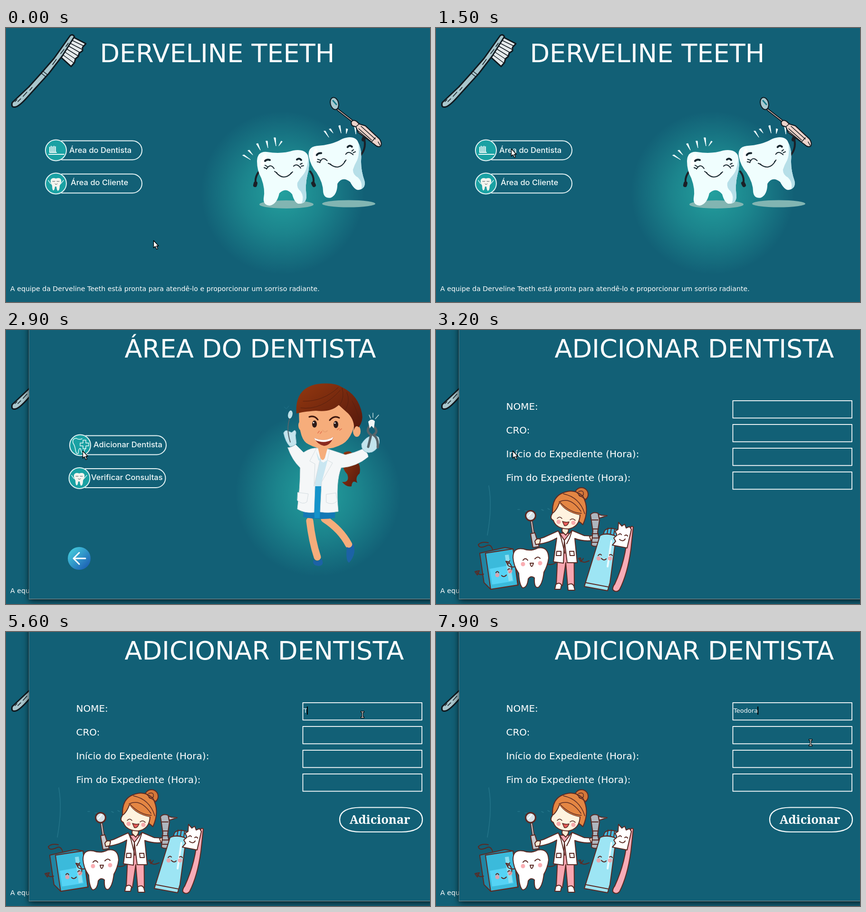
An HTML page for the animation above (8000 ms loop, 892x577 px).

```html
<!DOCTYPE html>
<html lang="pt">
<head>
<meta charset="utf-8">
<title>Clínica</title>
<style>
html, body { margin: 0; width: 100%; height: 100%; overflow: hidden; background: #126076; }
svg { display: block; width: 892px; height: 577px; stroke-linecap: round; stroke-linejoin: round; }
text { font-family: "DejaVu Sans", sans-serif; fill: #fff; stroke: none; }
.title { font-size: 54px; }
.label { font-size: 20px; }
.caption { font: 500 16.5px Inter, sans-serif; fill: #f1fafa; }
.line { fill: none; }
.ink { stroke: #10191f; stroke-width: 3; }
.brown { stroke: #5a2a24; stroke-width: 2; }
.skin { fill: #f6ad7b; }
</style>
</head>
<body>
<svg viewBox="0 0 892 577">
<defs>
  <radialGradient id="glow">
    <stop offset="0" stop-color="#23a09e"/>
    <stop offset=".5" stop-color="#23a09e" stop-opacity=".56"/>
    <stop offset="1" stop-color="#23a09e" stop-opacity="0"/>
  </radialGradient>
  <linearGradient id="blue" x2="1" y2="1">
    <stop offset=".1" stop-color="#45cbdc"/><stop offset=".9" stop-color="#1c5fb4"/>
  </linearGradient>
  <linearGradient id="hair" x2="1" y2="1">
    <stop offset="0" stop-color="#94380f"/><stop offset="1" stop-color="#55180d"/>
  </linearGradient>
  <g id="pill" stroke="#e3f2f3" stroke-width="2">
    <path class="line" d="M12-20H161a20 20 0 0 1 0 40H12"/>
    <circle r="22" fill="#1aa1a3"/>
  </g>
  <g id="molar" stroke="none">
    <path fill="#f4f4ee" d="M-11-8Q-8-14 0-11Q9-14 11-8Q12-2 8 4Q8 14 4 15Q2 14 1 6H-2Q-3 15-6 14Q-8 11-8 4Q-12-2-11-8Z"/>
    <path class="line" stroke="#d5eeee" stroke-width="1.5" d="M-11 0L-16-7M10 0L16-7"/>
    <path class="line" stroke="#42565c" d="M-7-5H-2M2-5H7M-2 0Q0 3 3 0"/>
  </g>
  <g id="tooth">
    <path fill="#f0fefe" d="M528 280Q529 259 549 261Q580 266 604 258Q628 254 635 268Q641 287 634 310Q629 330 632 354Q632 371 615 370Q607 368 602 350Q589 334 575 348Q570 371 555 374Q541 373 542 359Q546 340 537 316Q528 300 528 280Z"/>
    <path fill="#b6dfe8" d="M636 273Q640 289 634 310Q629 330 632 354Q632 366 622 369Q628 356 620 344Q611 337 613 326Q618 317 626 308Q634 297 636 273Z"/>
    <ellipse cx="542" cy="279" rx="5" ry="14" fill="#fff" transform="rotate(18 542 279)"/>
    <g class="line" stroke="#17252d" stroke-width="2">
      <path d="M548 297Q556 284 564 296M545 289l5 3M543 294l5 2M605 291Q612 284 620 295M619 287l4-2M621 291l5-1M568 304Q584 323 601 305M565 302l5 3M599 306l4-3"/>
      <path stroke-width="4" d="M545 280Q549 276 555 278M612 277Q617 273 621 278"/>
    </g>
  </g>
</defs>

<g id="home">
  <circle cx="582" cy="347" r="172" fill="url(#glow)"/>
  <text class="title" x="197.500" y="72">DERVELINE TEETH</text>
  <text x="9" y="554" font-size="14.2">A equipe da Derveline Teeth está pronta para atendê-lo e proporcionar um sorriso radiante.</text>

  <g class="ink">
    <path fill="#e5eaeb" d="M139 18L168 33L161 41L161 48L154 53L152 60L146 65L144 73L137 81L116 62Z"/>
    <path class="line" stroke-width="1.5" d="M137 25L164 38M133 31L160 45M130 37L156 52M126 43L152 59M123 50L147 66M119 56L142 73"/>
    <path fill="#a9c6cc" d="M13 157L48 124L75 94L101 64L135 16Q140 12 144 18L119 58L90 96L69 119L42 149Q28 164 21 166Q10 169 13 157Z"/>
    <path class="line" stroke-width="1.5" d="M74 95l10 8M78 91l10 8M25 155l6-6M36 144l8-9M50 131l5-6M19 155l4-4M98 77l8-11M115 54l7-9M126 39l5-7"/>
  </g>

  <use href="#pill" x="105" y="257.500"/>
  <text class="caption" x="133" y="263">Área do Dentista</text>
  <path class="line" stroke="#e9f7f7" stroke-width="2" d="M90 266H122M93 262H106M92 251V262M95 249V262M98 250V262M101 249V262M104 250V262"/>
  <use href="#pill" x="105" y="327.500"/>
  <text class="caption" x="136" y="331">Área do Cliente</text>
  <use href="#molar" x="105" y="328"/>

  <ellipse cx="590" cy="371.500" rx="57" ry="8.500" fill="#82b5b2"/>
  <ellipse cx="721" cy="370" rx="56" ry="7.500" fill="#82b5b2"/>
  <g class="line" stroke="#1b2027" stroke-width="4">
    <path d="M531 304Q524 314 525 324M640 302Q648 312 647 324M746 268Q758 254 754 235"/>
    <path stroke-width="8" d="M525 327l-1 4M646 327l2 4M753 232l-1 3"/>
  </g>
  <use href="#tooth"/>
  <use href="#tooth" transform="translate(698 293) rotate(-12) translate(-583 -314)"/>
  <path fill="#f5ffff" stroke="#f5ffff" d="M498 268l3-1l13 10zM509 258l3-1l7 10zM527 244l3-1l5 14zM547 238l3 0l1 14zM564 231l3 0l1 17zM581 239l-2-1l-5 10zM669 217l3 0l7 13zM680 213l3-1l5 9zM700 206l3-1l2 16zM716 212l3 1l-3 9zM733 207l3 1l0 15z"/>
  <g class="ink">
    <path class="line" stroke-width="5" d="M698 172L730 197"/>
    <path class="line" stroke="#e8cfc8" stroke-width="1.500" d="M698 172L730 197"/>
    <ellipse cx="691" cy="159" rx="8.500" ry="13" fill="#a7c8ce" stroke-width="2" transform="rotate(-15 691 159)"/>
    <path class="line" stroke="#187a8a" d="M688 153l7 8"/>
    <path fill="#ebd2ca" stroke-width="2" d="M727 197Q731 192 738 197L743 202L756 206L786 234Q792 244 788 249Q782 252 775 245L741 220L736 208L729 206Q725 202 727 197Z"/>
    <path class="line" stroke-width="1.500" d="M743 202l-7 6M742 212l27 24M747 207l30 27M739 215l29 24M777 231l-8 9M783 240l4 7"/>
  </g>
</g>

<g id="window">
  <rect x="48.500" y="-20" width="870" height="586.500" fill="#126076" stroke="#8b9294" style="filter:drop-shadow(0 3px 7px #000b)"/>

  <g id="dentist">
    <circle cx="656" cy="345" r="174" fill="url(#glow)"/>
    <text class="title" x="249.500" y="58">ÁREA DO DENTISTA</text>
    <use href="#pill" x="156" y="242.500"/>
    <text class="caption" x="184" y="247">Adicionar Dentista</text>
    <g class="line" stroke="#def4f4" stroke-width="1.500">
      <path d="M160 229Q153 232 148 228Q139 228 141 238Q145 244 146 252Q148 263 152 260Q153 247 157 250Q159 261 163 259L167 249"/>
      <path d="M162 232h6v6h6v6h-6v6h-6v-6h-6v-6h6z"/>
    </g>
    <use href="#pill" x="154.500" y="312"/>
    <text class="caption" x="179" y="316">Verificar Consultas</text>
    <use href="#molar" x="154" y="313"/>
    <circle cx="154" cy="481" r="24" fill="url(#blue)"/>
    <path class="line" stroke="#fff" stroke-width="3" d="M167 481H142M154 469L142 481L154 493"/>

    <path fill="url(#hair)" d="M711 258Q729 249 733 271Q748 282 744 302Q734 310 739 322Q728 314 727 329Q717 332 707 320Q724 321 718 304Q706 292 708 272Z"/>
    <path class="line" stroke="#f6ad7b" stroke-width="15" d="M639 402Q644 445 655 478M670 398Q704 420 721 452"/>
    <path fill="#1c62a6" d="M647 484Q656 490 664 482Q671 496 657 497Q643 495 647 484ZM717 457Q726 462 730 449Q739 470 722 490Q714 488 717 457Z"/>
    <path fill="#1479b5" d="M626 372H693L692 396Q660 401 625 394Z"/>
    <path fill="#c9e6f1" d="M650 270H678L664 334H648Z"/>
    <path fill="#1593ca" d="M647 329H663L660 396H649Z"/>
    <g fill="#f5f7f8" stroke="#d3dce0">
      <path d="M593 248Q602 247 609 241L626 258Q642 247 656 249L650 330L648 384Q628 386 613 377Q619 330 619 290Q602 274 593 248Z"/>
      <path d="M675 250Q697 257 714 263Q735 258 750 251Q761 257 762 267Q737 288 705 290Q693 320 699 382Q678 386 661 383L664 322Z"/>
      <path d="M653 249L639 276L650 282L648 329L662 266L664 320L687 280L676 274L681 252Z"/>
      <path d="M614 342L636 345L633 362Q624 369 613 359ZM674 346L694 343L697 360Q687 370 674 363Z"/>
    </g>
    <path class="skin" d="M655 243H678L671 269Q666 279 661 268Z"/>
    <path fill="#c9e6f1" d="M652 255L662 277L650 328H662L677 273L668 279L657 274Z"/>
    <g class="skin">
      <ellipse cx="622" cy="201" rx="7" ry="11"/><ellipse cx="738" cy="213" rx="8" ry="12"/>
      <path d="M617 160Q613 232 637 241Q672 260 708 240Q733 226 738 168Q706 132 617 160Z"/>
    </g>
    <path fill="url(#hair)" d="M611 176Q607 123 654 114Q690 109 708 121Q741 137 749 176Q752 192 742 205Q736 198 732 211Q734 191 720 176L700 158Q683 174 652 170Q624 172 611 176Z"/>
    <path class="line" stroke="#58200e" d="M620 164Q665 170 703 127M625 150Q667 151 699 121M702 158Q713 142 707 122M714 168Q725 150 717 131M743 188Q737 165 728 149"/>
    <g class="line" stroke="#3c170e" stroke-width="3">
      <path d="M638 183Q649 179 656 189M681 190Q690 179 701 185"/>
      <path stroke="#eaa071" stroke-width="2" d="M666 211Q671 218 676 212"/>
      <path stroke="#e77d57" stroke-width="2" d="M656 217l3-4M661 218l3-4M697 210l4-3M702 211l4-3"/>
    </g>
    <g fill="#2c1a18"><ellipse cx="649" cy="198" rx="5" ry="7.500"/><ellipse cx="694" cy="199" rx="5" ry="7.500"/></g>
    <circle cx="647" cy="195" r="1.500" fill="#fff"/><circle cx="692" cy="196" r="1.500" fill="#fff"/>
    <path fill="#8b2a20" d="M648 227Q669 237 689 225Q683 243 669 244Q655 241 648 227Z"/>
    <path fill="#fff" d="M648 227Q669 237 689 225L686 231Q669 240 651 232Z"/>
    <g fill="#c3e4ed" stroke="#8fbdcb">
      <path d="M584 217Q587 209 594 213L601 216L607 211Q612 213 609 222L611 239Q604 246 597 245Q588 236 584 217Z"/>
      <path d="M748 240Q754 230 761 226Q774 218 784 226Q788 237 782 247Q771 262 757 257Q747 252 748 240Z"/>
    </g>
    <path class="line" stroke="#53646c" stroke-width="2" d="M597 186Q589 207 598 236"/>
    <ellipse cx="598" cy="178" rx="4" ry="8" fill="#b8e1ea" stroke="#dceff1" transform="rotate(12 598 178)"/>
    <path class="line" stroke="#56646a" stroke-width="5" d="M764 204Q757 214 768 221L762 246M775 205Q784 214 773 221Q784 228 782 247"/>
    <path fill="#f2f5f5" d="M762 193Q769 185 776 192L774 207L769 202L765 207Z"/>
    <path class="line" stroke="#bcd8da" stroke-width="1.500" d="M764 179l3 7M772 175v9M784 179l-7 8"/>
    <path class="line" stroke="#21738a" d="M585 162l5 4M595 160l-4 5"/>
  </g>

  <g id="form">
    <text class="title" x="249.500" y="58">ADICIONAR DENTISTA</text>
    <text class="label" x="147.500" y="168">NOME:</text>
    <text class="label" x="147.500" y="218">CRO:</text>
    <text class="label" x="147.500" y="268">Início do Expediente (Hora):</text>
    <text class="label" x="147.500" y="318">Fim do Expediente (Hora):</text>
    <path class="line" stroke="#fff" stroke-width="1.700" d="M624.500 148.800h250.500v36.500h-250.500zm0 50h250.500v36.500h-250.500zm0 50h250.500v36.500h-250.500zm0 50h250.500v36.500h-250.500z"/>
    <text id="name" x="626" y="170" font-size="13"></text>
    <rect id="caret" y="157" width="2" height="17"/>
    <g id="submit">
      <path class="line" stroke="#f5fbfb" stroke-width="2.200" d="M702 395C702 377 720 369.500 746 369.500H832C858 369.500 876 377 876 395S858 421 832 421H746C720 421 702 413 702 395Z"/>
      <text x="786.500" y="404" text-anchor="middle" style="font:bold 25.500px 'Noto Serif',serif">Adicionar</text>
    </g>
    <path class="line" stroke="#24758a" stroke-width="1.500" d="M111 328Q119 372 108 432M172 378h4M187 381h5M222 378l4 2M235 376l4 2"/>

    <g class="brown">
      <path fill="#2085a3" d="M92 470L145 458L162 461L173 537L115 546L101 532Z"/>
      <path fill="#3bbadb" d="M104 470L162 461L172 537L115 546Z"/>
      <path fill="#55d3f5" stroke="none" d="M113 503L157 495L163 529L118 536Z"/>
      <path stroke="none" fill="#8bdff1" d="M145 474l8-1 8 54-8 2z"/>
      <path class="line" d="M119 462Q115 449 105 455Q91 461 89 452Q96 445 110 448M100 514Q90 518 85 508M85 508l-3 1 5 7 4-9zM154 511Q166 502 152 488M152 488l-5-1 4 7 4-8"/>

      <path class="line" stroke-width="5" d="M201 404L205 430"/>
      <path class="line" stroke="#c7cbd0" d="M201 404L205 430"/>
      <circle cx="199" cy="391" r="10.500" fill="#d7e2e7" stroke-width="3"/>
      <path class="line" stroke="#fff" d="M194 393l7-8"/>
      <path fill="#c5c8ce" d="M199 429l9-2 9 29-13 2z"/>

      <path fill="#f8a6b0" d="M258 428H290L291 538H277L273 490L266 538H253Z"/>
      <path fill="#fff" d="M252 536Q260 530 264 537L262 546H250ZM277 537Q286 531 290 539L292 548H278Z"/>
      <path fill="#fff" d="M257 423L226 437Q216 439 212 444L216 451Q240 447 254 438L247 488L268 491L270 443ZM286 422L312 433L332 434L331 443Q310 446 292 439L297 490H276L270 443Z"/>
      <path class="line" d="M258 424L263 437L271 470M286 423L281 438L275 450M254 466h9v9h-10zM281 466h9l1 9h-9z"/>
      <path fill="#fdebd4" d="M266 414H280L278 425L273 432L265 424ZM208 445q4-8 12-4l-2 9-8 2zM323 435q9-5 12 4l-9 4z"/>
      <circle cx="306" cy="346" r="14" fill="#d5783a"/>
      <path fill="#e48643" d="M246 397Q240 353 267 343Q291 333 309 350Q324 377 309 410Q300 401 296 402Z"/>
      <path fill="#fff3df" d="M245 386Q254 380 260 363Q273 383 303 389Q302 415 278 419Q252 418 247 401Q238 397 245 386Z"/>
      <path fill="#e48643" stroke="none" d="M259 363Q270 349 290 355Q307 367 303 389Q274 383 259 363Z"/>
      <path class="line" stroke-width="1.500" d="M261 363Q282 385 306 386M259 362Q283 350 305 382M268 345Q302 352 313 387M296 342Q311 357 317 356M300 340q12-4 10 7q-6 7-10 0M255 397q5-6 10 0M282 400q6-5 11 1"/>
      <path fill="#e95d59" stroke-width="1.500" d="M266 403Q273 406 280 404Q276 414 270 412Z"/>

      <path fill="#aeb5bd" d="M325 389Q331 382 341 386L344 400L340 426L345 451Q336 459 327 453L330 423Z"/>
      <path fill="#c7cbd0" d="M342 388l6 2 12 1-12 4-5 1z"/>
      <path class="line" d="M328 400h13M329 419h12M328 429h14M328 438h15M327 447h17"/>

      <path fill="#9de5f4" d="M345 433Q357 426 379 434L366 532L361 549L312 540Z"/>
      <path fill="#43b9de" d="M355 422Q365 414 382 421L380 435Q365 427 352 430Z"/>
      <path class="line" d="M315 532L362 541M362 417l-2 12M369 417l-2 12M376 419l-2 12M322 486Q305 494 304 480l-4 1 5 7 5-7"/>
      <path class="line" stroke="#e9fbff" stroke-width="4" d="M369 444L361 498"/>
      <path fill="#f8acb7" d="M409 417Q411 411 415 415L410 462Q403 514 386 547Q379 554 372 547Q371 541 376 535Q394 496 400 455Z"/>
      <path fill="#fff" d="M384 405L391 413L397 409L400 417L407 414L411 420L402 459L371 453L378 445L374 438L381 432L377 424L383 420Z"/>
      <path fill="#fff" d="M162 479Q162 457 184 461Q199 467 214 459Q236 455 237 480Q235 496 227 510Q224 536 215 542Q206 544 207 522Q200 516 194 524Q192 543 182 543Q175 536 174 512Q163 497 162 479Z"/>
      <path class="line" d="M165 499Q148 500 150 488M234 493Q245 496 253 489"/>
      <path class="line" d="M183 485q5-7 10 0M208 482q6-7 11-1M198 491q3 14 7 0zM126 511q3-5 6 0M151 505q3-4 5-1M138 517q5 5 10-1M341 475q4-5 7-1M365 474q3-3 6 1M348 481q5 6 10 1M384 431q4-4 6 0M397 433q4-3 6 1M386 441q8 6 12-1"/>
    </g>
    <path class="line" stroke="#f99aa0" stroke-opacity=".8" stroke-width="9" d="M129 516h0M156 508h0M183 493h0M219 491h0M342 481h0M366 481h0M258 404h0M289 406h0"/>
  </g>
</g>

<path id="arrow" fill="#fff" stroke="#000" stroke-width="1.300" d="M.5.5V16L4 12.800L6.800 19L9.300 18L6.600 12H11Z"/>
<g id="beam" class="line" stroke-linecap="butt">
  <path stroke="#000" stroke-width="3.500" d="M-4-6H4M-4 6H4M0-7V7"/>
  <path stroke="#fff" stroke-width="1.200" d="M-3-6H3M-3 6H3M0-6V6"/>
</g>
</svg>
<script>
const $ = id => document.getElementById(id);
const LOOP = 8000, STEP = 100, NAME = "Teodora";
const keyTimes = [5600, 6100, 6300, 6600, 6800, 7000, 7100];
const blinkTimes = [4200, 4800, 5000, 5700, 6000, 6600, 6900, 7500, 7800];
// Pointer stops: time, x, y
const stops = [
  [0, 310, 447], [300, 310, 447], [400, 308, 427], [1000, 308, 427], [1500, 158, 254],
  [2800, 158, 254], [2900, 161, 254], [3200, 161, 254], [4000, 753, 181], [4200, 750, 174],
  [7700, 750, 174], [7800, 791, 235], [7900, 788, 233], [LOOP, 788, 233]
];
const passed = (times, t) => times.filter(time => time <= t).length;
const show = (id, on) => { $(id).style.display = on ? "" : "none"; };

function pointerAt(t) {
  const i = stops.findIndex(stop => stop[0] > t);
  const [t0, x0, y0] = stops[i - 1], [t1, x1, y1] = stops[i];
  const u = (t - t0) / (t1 - t0), k = u * u * (3 - 2 * u);
  return [x0 + (x1 - x0) * k, y0 + (y1 - y0) * k].map(Math.round);
}

function draw(t) {
  show("window", t >= 1900);
  show("dentist", t < 3200);
  show("form", t >= 3200);
  show("submit", t >= 3300);

  $("name").textContent = NAME.slice(0, passed(keyTimes, t));
  show("caret", passed(blinkTimes, t) % 2);
  $("caret").setAttribute("x", 625 + $("name").getComputedTextLength());

  const [x, y] = pointerAt(t), overField = x > 624;
  show("arrow", !overField);
  show("beam", overField);
  $(overField ? "beam" : "arrow").setAttribute("transform", `translate(${x} ${y})`);
}

const start = performance.now();
function tick() {
  const t = (performance.now() - start) % LOOP;
  draw(Math.floor(t / STEP) * STEP);
  requestAnimationFrame(tick);
}
tick();
</script>
</body>
</html>
```
